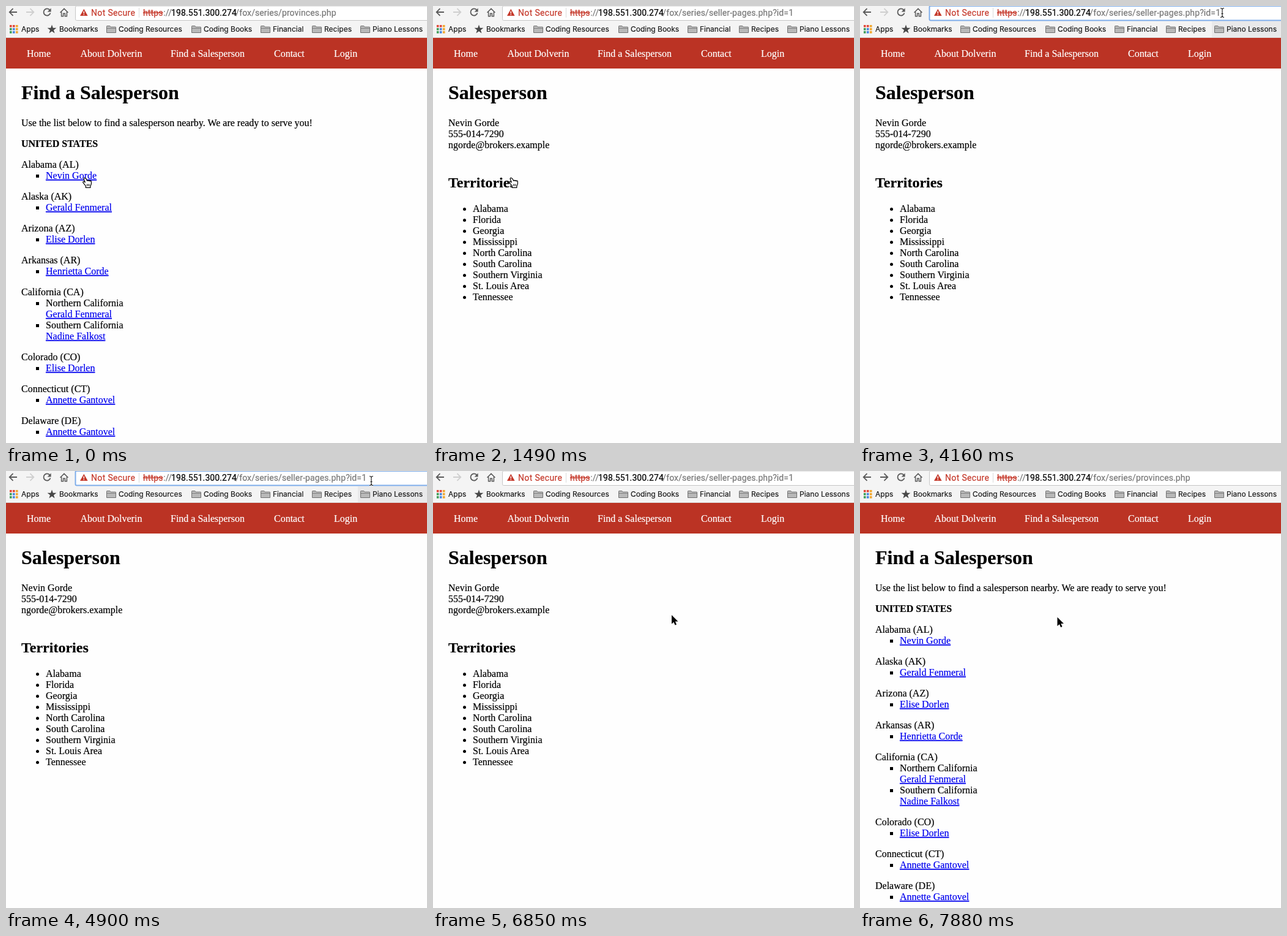
Write an HTML page that moves like this. It is 688 px wide and 713 px high and loops after 8 s.

```html
<!DOCTYPE html>
<html lang="en">
<head>
<meta charset="utf-8">
<title>Find a Salesperson</title>
<style>
html, body { margin: 0; width: 100%; height: 100%; overflow: hidden; background: #fefefe; }
svg { display: block; width: 100%; height: 100%; }
text { font: 16px "Liberation Serif", "Times New Roman", serif; color: #000; fill: currentColor; stroke: currentColor; stroke-width: .2px; }
.h1 { font-size: 32px; font-weight: bold; }
.h2 { font-size: 24px; font-weight: bold; }
.b { font-weight: bold; }
.link { color: #00e; text-decoration: underline; }
.nav { color: #fff; }
.mark { font: 12px Inter, sans-serif; color: #1c1c1c; }
.url { font: 14px Roboto, sans-serif; letter-spacing: .1px; }
.red { color: #c5392b; }
.strike { text-decoration: line-through; }
.grey { color: #777; }
.icon { fill: none; stroke: #5a5a5a; stroke-width: 1.8; }
</style>
</head>
<body>
<svg id="stage" viewBox="0 0 688 713"></svg>
<script>
const LOOP = 8000;
const stage = document.getElementById('stage');
const text = (x, y, str, cls = '') => `<text x="${x}" y="${y}" class="${cls}">${str}</text>`;
const rect = (x, y, w, h, fill, more = '') =>
  `<rect x="${x}" y="${y}" width="${w}" height="${h}" fill="${fill}" ${more}/>`;
const path = (d, more = '') => `<path d="${d}" ${more}/>`;
const group = (id, body) => `<g id="${id}">${body}</g>`;

function folder(x, label) {
  return path(`M${x + .5} 43.5V33.2q0-.7.7-.7h4.6l1.4 1.7h7.6q.7 0 .7.7v8.6z`, 'fill="#b9b9b9" stroke="#707070"') +
    path(`M${x + 1} 36.5h14`, 'stroke="#808080"') + text(x + 20, 42, label, 'mark');
}

function star(cx, cy) {
  const points = Array.from({ length: 10 }, (_, i) => {
    const r = i % 2 ? 3.1 : 7.8, a = i * Math.PI / 5 - Math.PI / 2;
    return `${cx + r * Math.cos(a)},${cy + r * Math.sin(a)}`;
  });
  return `<polygon points="${points.join(' ')}" fill="#484848"/>`;
}

function appGrid() {
  const colours = ['#e2493b', '#e2493b', '#f0a830', '#3f9f5a', '#4a86e0', '#f0a830', '#3f9f5a', '#4a86e0', '#f0a830'];
  return colours.map((c, i) => rect(6 + i % 3 * 5, 31 + Math.floor(i / 3) * 5, 3.6, 3.6, c)).join('');
}

function browser() {
  const nav = [[34, 'Home'], [121.5, 'About Dolverin'], [269, 'Find a Salesperson'], [438, 'Contact'], [536, 'Login']];
  const folders = [[164, 'Coding Resources'], [303, 'Coding Books'], [416, 'Financial'], [500, 'Recipes'], [579, 'Piano Lessons']];
  return rect(0, 0, 688, 52, '#f4f4f4') +
    rect(113.5, 0, 600, 23.5, '#fff', 'id="box" rx="2"') +
    rect(575, 25, 113, 26, '#e9e9ea', 'id="hover"') +
    rect(0, 51, 688, 1, '#dcdcdc') +
    path('M18 10H6M11.5 4.2L5.7 10l5.8 5.8', 'class="icon"') +
    path('M33 10h12M39.5 4.2L45.3 10l-5.8 5.8', 'class="icon" id="forward"') +
    group('reload', path('M71.6 6.6A5.6 5.6 0 1 0 72.5 11.5', 'class="icon"') +
      path('M73.6 3.4v6h-6z', 'fill="#5a5a5a"')) +
    path('M62 5l10 10M72 5L62 15', 'class="icon" id="stop"') +
    path('M88.5 10.8L95 4.4l6.5 6.4M90.6 9.5v7.2h3v-4.4h2.8v4.4h3V9.5', 'class="icon" style="stroke-width:1.5"') +
    path('M127.3 4.8L133.6 16H121z', 'fill="#c5392b"') +
    path('M127.3 8.6v3.6M127.3 13.2v1.5', 'stroke="#fff" stroke-width="1.4"') +
    `<text x="139" y="15.5" class="url red" style="letter-spacing:.35px">Not Secure</text>` +
    rect(217, 3, 1, 16, '#dadada') +
    rect(224, 2, 366, 17, '#a9cdf7', 'id="all"') + rect(583, 2, 7, 17, '#a9cdf7', 'id="one"') +
    text(224, 15.5, 'https', 'url red strike') + text(257.3, 15.5, '://', 'url grey') +
    text(270, 15.5, '198.551.300.274', 'url') +
    '<text x="375.3" y="15.5" class="url grey" id="address"></text>' +
    appGrid() + text(25, 42, 'Apps', 'mark') + star(75, 38.2) + text(87, 42, 'Bookmarks', 'mark') +
    folders.map(f => folder(...f)).join('') +
    rect(0, 52, 688, 50, '#bb3324') + nav.map(([x, s]) => text(x, 83, s, 'nav')).join('');
}

function listPage() {
  const people = { n: 'Nevin Gorde', g: 'Gerald Fenmeral', e: 'Elise Dorlen', h: 'Henrietta Corde', f: 'Nadine Falkost', a: 'Annette Gantovel' };
  const states = [
    ['Alabama (AL)', 'n'], ['Alaska (AK)', 'g'], ['Arizona (AZ)', 'e'], ['Arkansas (AR)', 'h'],
    ['California (CA)', 'g', 'Northern California', 'f', 'Southern California'],
    ['Colorado (CO)', 'e'], ['Connecticut (CT)', 'a'], ['Delaware (DE)', 'a']
  ];
  let y = 264;
  let out = text(25, 152, 'Find a Salesperson', 'h1') +
    text(25, 196, 'Use the list below to find a salesperson nearby. We are ready to serve you!') +
    text(25, 230, 'UNITED STATES', 'b');
  for (const [state, ...rest] of states) {
    out += text(25, y, state);
    for (let i = 0; i < rest.length; i += 2) {
      y += 18;
      out += rect(49, y - 7, 5, 5, '#000');
      if (rest[i + 1]) {
        out += text(65, y, rest[i + 1]);
        y += 18;
      }
      out += text(65, y, people[rest[i]], 'link');
    }
    y += 34;
  }
  return out;
}

function personPage() {
  const areas = ['Alabama', 'Florida', 'Georgia', 'Mississippi', 'North Carolina', 'South Carolina',
    'Southern Virginia', 'St. Louis Area', 'Tennessee'];
  return text(25, 152, 'Salesperson', 'h1') +
    ['Nevin Gorde', '555-014-7290', 'ngorde@brokers.example'].map((s, i) => text(25, 196 + 18 * i, s)).join('') +
    text(25, 296, 'Territories', 'h2') +
    areas.map((s, i) => `<circle cx="51.5" cy="${331.5 + 18 * i}" r="2.5"/>` + text(65, 336 + 18 * i, s)).join('');
}

const swipe = '<circle cx="-14.5" cy="442.5" r="68.5" fill="#000" fill-opacity=".21"/>' +
  path('M36.5 441.5H3M17 426.5L2 441.5l15 15', 'fill="none" stroke="#fff" stroke-width="9" stroke-linecap="round" stroke-linejoin="round"');

const cursors =
  group('hand', path('M4.3 1.3c-1.2-.9-2.6.2-2.1 1.5l2.1 5.4-2-1.2C1 6.4.2 7.8 1.1 8.8l4.2 5.4v2.6h7.6v-2.4l1.5-3.6V6.9c0-1.5-1.9-1.7-2.1-.4 0-1.5-2-1.8-2.3-.5-.2-1.3-1.9-1.5-2.3-.2L6 2.4z', 'fill="#fff" stroke="#000" stroke-width="1.2" stroke-linejoin="round"') +
    path('M7.4 11v3.2M9.3 11v3.2M11.2 11v3.2', 'stroke="#000" stroke-width=".9"')) +
  group('arrow', path('M0 0V14.6L3.4 11.4 5.6 16.5 8 15.4 5.9 10.5H10.5Z', 'stroke="#fff" stroke-width="1.6" paint-order="stroke"')) +
  group('beam', ['#fff', '#111'].map((c, i) =>
    path('M-3-7.5Q0-7.5 0-5V5Q0 7.5-3 7.5M3-7.5Q0-7.5 0-5M0 5Q0 7.5 3 7.5M-1.5 1.5h3', `fill="none" stroke="${c}" stroke-width="${i ? 1.1 : 2.6}"`)).join(''));

stage.innerHTML = rect(0, 0, 688, 713, '#fefefe') + browser() + group('list', listPage()) +
  group('person', personPage()) + group('swipe', swipe) + cursors;

// Pointer: start time, shape, x, y
const pointer = [
  [0, 'hand', 125, 279.5], [140, 'hand', 124, 279.5], [2230, 'arrow', 123, 322], [2380, 'arrow', 120, 373],
  [2680, 'arrow', 146, 362], [2830, 'arrow', 296, 268], [2980, 'arrow', 520, 112], [3120, 'arrow', 621.5, 40.5],
  [3270, 'arrow', 622, 27], [3420, 'beam', 614, 15], [3570, 'beam', 608, 13],
  [3860, 'beam', 602, 12], [4010, 'beam', 595, 11], [4160, 'beam', 592, 11],
  [4900, 'beam', 597, 16], [5050, 'beam', 594, 12], [5200, 'beam', 591.5, 10.5], [5500, 'none', 0, 0],
  [5950, 'arrow', 584, 40], [6100, 'arrow', 560, 118], [6250, 'arrow', 515, 232], [6400, 'arrow', 500, 229],
  [6850, 'arrow', 390, 235], [7000, 'arrow', 322.5, 238.5]
];
const $ = id => document.getElementById(id);
const show = (id, on) => $(id).style.display = on ? '' : 'none';

function draw(t) {
  const during = (a, b) => t >= a && t < b;
  const [, shape, x, y] = pointer.filter(p => p[0] <= t).pop();
  for (const id of ['hand', 'arrow', 'beam']) show(id, id === shape);
  if (shape !== 'none') $(shape).setAttribute('transform', `translate(${x} ${y})`);

  const loading = during(740, 1490) || during(7450, 7880);
  show('stop', loading);
  show('reload', !loading);
  $('forward').style.stroke = t >= 7450 ? '#5a5a5a' : '#cfcfcf';
  $('address').textContent = '/fox/series/' + (during(1040, 7600) ? 'seller-pages.php?id=1' : 'provinces.php');

  const focus = during(4160, 6400);
  $('box').setAttribute('stroke', focus ? '#7fadea' : '#c6c6c6');
  $('box').setAttribute('stroke-width', focus ? 2 : 1);
  show('hover', during(3270, 5950));
  show('all', during(4300, 4900));
  show('one', during(5200, 6400));

  const person = during(1490, 7740);
  show('person', person);
  show('list', !person);
  show('swipe', during(7300, 7740));
  $('swipe').setAttribute('transform', `translate(${t < 7450 ? -28 : 0} 0)`);
  $('swipe').setAttribute('opacity', t < 7600 ? 1 : .5);
}

function tick() {
  draw(performance.now() % LOOP);
  requestAnimationFrame(tick);
}
tick();
</script>
</body>
</html>
```
